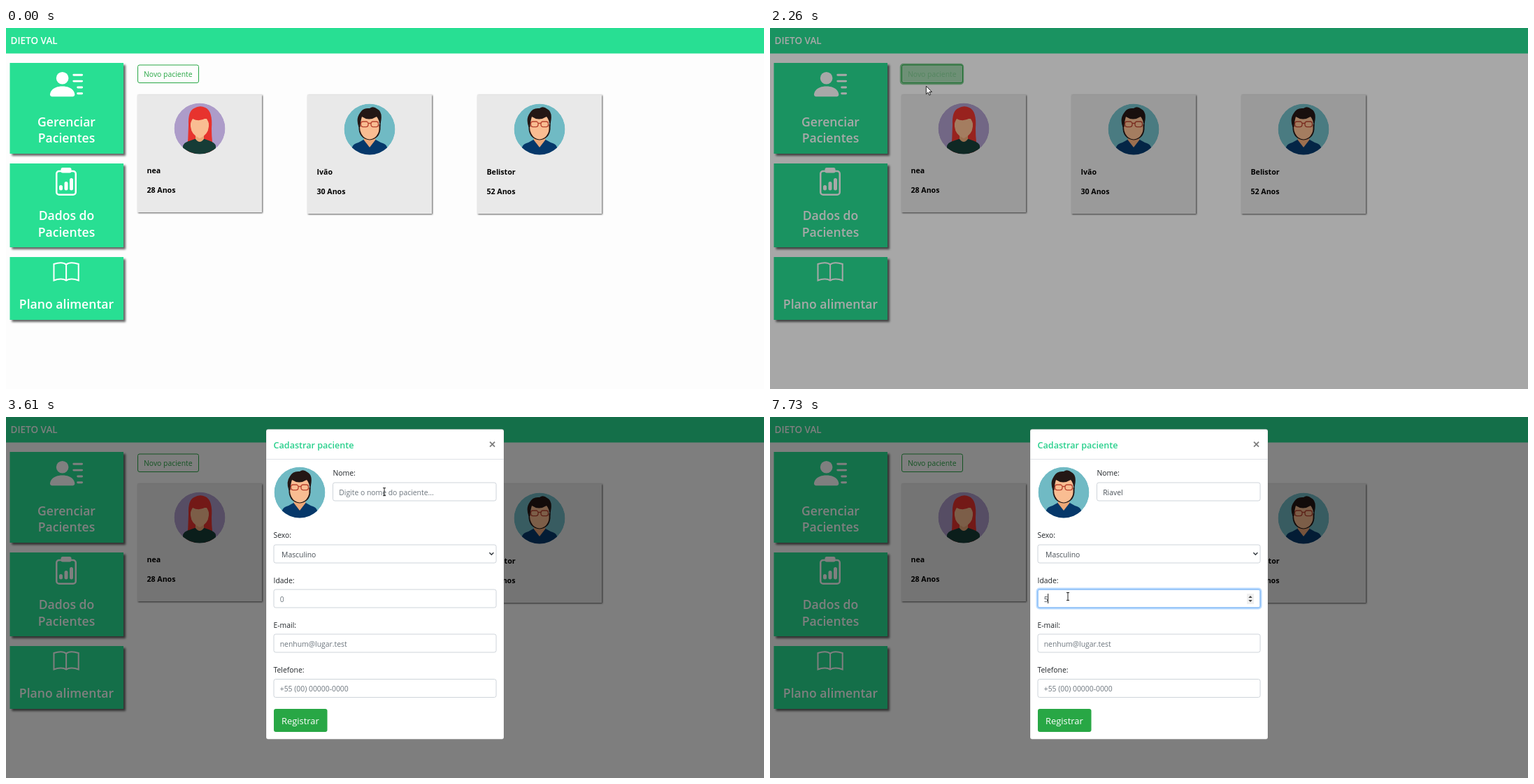
These frames come from a looping animation (1084x517 px, 8 s). An HTML page:

```html
<!DOCTYPE html>
<html lang="pt">
<head>
<meta charset="utf-8">
<title>Pacientes</title>
<style>
  html, body { margin: 0; width: 100%; height: 100%; overflow: hidden; background: #fdfdfd; }
  svg { display: block; width: 100%; height: 100%; }
  text { font: 10.4px "Open Sans", "Noto Sans", sans-serif; white-space: pre; }
  .brand { font-size: 13.5px; font-weight: 600; fill: #fff; }
  .tile { font-size: 17.6px; font-weight: 600; fill: #fff; text-anchor: middle; }
  .bold { font-size: 10.6px; font-weight: 700; }
  .title { font-size: 12.6px; font-weight: 600; fill: #28d08c; }
  .submit { font-size: 12.9px; font-weight: 500; fill: #fff; }
  .label { fill: #212529; }
  .hint { fill: #6c757d; }
  .value { fill: #495057; }
  .tileBox { fill: #28df93; filter: drop-shadow(3px 3px 1.6px rgba(0,0,0,.6)); }
  .card { fill: #e9e9e9; filter: drop-shadow(1.7px 1.7px 1px rgba(0,0,0,.65)); }
  .field { fill: #fff; stroke: #ced4da; }
  .line { fill: none; stroke: #fff; stroke-linecap: round; }
  .cursor { fill: #fff; stroke: #111; stroke-width: .9; stroke-linejoin: round; }
</style>
</head>
<body>
<svg id="stage" viewBox="0 0 1084 517">
  <defs>
    <clipPath id="disc"><circle r="36.5"/></clipPath>
    <g id="man" clip-path="url(#disc)">
      <circle r="36.5" fill="#70bac4"/>
      <path d="M-25 40V26Q-24 21-16 19L-7 14H7L16 19Q24 21 25 26V40Z" fill="#06386a"/>
      <path d="M-7 7H7L8.5 15 0 26-8.5 15Z" fill="#eda878"/>
      <path d="M-15.5-7V0Q-14 14 0 15.5 14 14 15.5 0V-7Z" fill="#241715"/>
      <path d="M-14-19H13.5V-3Q14 2 12 6 8 14 0 14.5-8 14-12 6-14 2-14-3Z" fill="#f9bd92"/>
      <path d="M-15.5-3Q-20-15-14-23-10-31 0-30 5-34 11-29 19-25 16-10L15-3Q14-14 10-18-1-11-11-18-13-12-13.5-3Z" fill="#241715"/>
      <g fill="none" stroke="#b8432f" stroke-width="1.3">
        <rect x="-12.5" y="-11" width="10.5" height="7.6" rx="3"/>
        <rect x="2" y="-11" width="10.5" height="7.6" rx="3"/>
        <path d="M-2-8.5H2"/>
      </g>
    </g>
    <g id="woman" clip-path="url(#disc)">
      <circle r="36.5" fill="#ad9cc9"/>
      <path d="M-8-29Q-17-25-16-5-16 15-19 36H21Q17 20 17 0 19-25 8-30 0-34-8-29Z" fill="#e7332e"/>
      <path d="M-24 40V25Q-23 20-14 17.5L-7 15H7L14 17.5Q22 20 23 25V40Z" fill="#163c36"/>
      <path d="M-6 8H6V15Q0 23-6 15Z" fill="#e9a877"/>
      <path d="M-13-14H13V-3Q12 9 0 14-12 9-13-3Z" fill="#f9bd92"/>
      <path d="M-14-2Q-17-20-8-27 2-33 12-25 17-18 14-2 13-11 9-15-1-9-10-14-13-10-14-2Z" fill="#e7332e"/>
    </g>
  </defs>

  <g id="page"></g>
  <rect id="backdrop" width="1084" height="517"/>
  <g id="modal"></g>
  <path id="arrow" class="cursor" d="M0 0V11.5L2.7 9 4.5 13 6.3 12.2 4.6 8.3H8.2Z"/>
  <path id="hand" class="cursor" d="M-1.3 9V1Q0-1 1.3 1V5.5Q2.6 4.6 3.6 6 4.9 5.3 5.7 6.6 7 6.2 7 8V11Q7 13.5 5.5 16H-.6Q-1.5 13.5-4.6 9.6-4.6 7.6-1.3 9.6Z"/>
  <path id="beam" d="M-2-5.5H2M0-5.5V5.5M-2 5.5H2" fill="none" stroke="#222"/>
</svg>
<script>
const $ = id => document.getElementById(id);
const label = (cls, x, y, s) => `<text class="${cls}" x="${x}" y="${y}">${s}</text>`;
const rect = (x, y, w, h, attrs) => `<rect x="${x}" y="${y}" width="${w}" height="${h}" ${attrs}/>`;

const tile = (y, h) => rect(5.5, y, 162.5, h, 'class="tileBox"');

function card(x, h, avatar, name, age) {
  const dy = h - 168.5;
  return rect(x, 95.5, 178, h, 'class="card"')
    + `<use href="#${avatar}" x="${x + 89}" y="${144 + dy / 2}"/>`
    + label('bold', x + 13.5, 208 + dy, name)
    + label('bold', x + 13.5, 235.5 + dy, age + ' Anos');
}

$('page').innerHTML = `
  <rect width="1084" height="517" fill="#fdfdfd"/>
  <rect width="1084" height="36.5" fill="#28df93"/>
  ${label('brand', 6.5, 22.5, 'DIETO VAL')}
  ${tile(50, 130)}${tile(194, 120)}${tile(328, 90)}
  <g transform="translate(63 57) scale(2.94)" fill="#fff">
    <circle cx="6" cy="5" r="3"/>
    <path d="M1 14s-1 0-1-1 1-4 6-4 6 3 6 4-1 1-1 1z"/>
    <path class="line" d="M11.5 3.5h4m-4 3h4m-2 3h2m-2 3h2"/>
  </g>
  <g transform="translate(66 200) scale(2.5)">
    <rect class="line" x="2.5" y="2" width="11" height="13.5" rx="1.5"/>
    <rect x="5" width="6" height="3" rx="1" fill="#fff"/>
    <path class="line" stroke-width="2" d="M5 11v1M8 9v3M11 7v5"/>
  </g>
  <path class="line" stroke-width=".85" transform="translate(67.3 331) scale(2.35)"
    d="M8 3.3C6.5 2 3.5 2 .5 3V13C3.5 11.8 6.5 12 8 13 9.5 12 12.5 11.8 15.5 13V3C12.5 2 9.5 2 8 3.3V13"/>
  ${label('tile', 86.5, 140.5, 'Gerenciar')}${label('tile', 86.5, 164, 'Pacientes')}
  ${label('tile', 86.5, 275, 'Dados do')}${label('tile', 86.5, 298.5, 'Pacientes')}
  ${label('tile', 86.5, 401.5, 'Plano alimentar')}
  ${rect(187, 52, 89, 28, 'id="buttonRing" rx="3.5" fill="none" stroke="#28a745" stroke-opacity=".55" stroke-width="2.4"')}
  ${rect(188.5, 53, 87, 25.5, 'rx="2.5" fill="#fdfdfd" stroke="#28a745"')}
  <text x="197" y="70" fill="#28a745">Novo paciente</text>
  <g id="buttonHover">
    ${rect(188, 52.5, 88, 26.5, 'rx="2.7" fill="#28a745"')}
    <text x="197" y="70" fill="#fff">Novo paciente</text>
  </g>
  ${card(188, 168.5, 'woman', 'nea', 28)}
  ${card(431, 170.5, 'man', 'Ivão', 30)}
  ${card(674, 170.5, 'man', 'Belistor', 52)}`;

// An input box with an optional focus state, hint, typed value and caret.
function field(id, x, y, hint) {
  const w = 701 - x, textX = x + 8.7;
  return rect(x, y, w, 26, 'rx="2.7" class="field"')
    + `<g id="${id}Focus" fill="none">`
    + rect(x - 1, y - 1, w + 2, 28, 'rx="3.6" stroke="#007bff" stroke-opacity=".27" stroke-width="3"')
    + rect(x, y, w, 26, 'rx="2.7" stroke="#80bdff"') + '</g>'
    + `<text id="${id}Hint" class="hint" x="${textX}" y="${y + 17.5}">${hint}</text>`
    + `<text id="${id}Value" class="value" x="${textX}" y="${y + 17.5}"></text>`
    + `<rect id="${id}Caret" x="${textX - .5}" y="${y + 6}" width="1" height="14" fill="#222"/>`;
}

$('modal').innerHTML = `
  ${rect(372, 17.5, 340, 444, 'rx="3" fill="#fff" stroke="#000" stroke-opacity=".2" stroke-width=".7"')}
  <path d="M372 60.5H712" stroke="#dee2e6"/>
  ${label('title', 382.5, 44.5, 'Cadastrar paciente')}
  <path d="M692 35.7l7 7m0-7l-7 7" stroke="#7f7f7f" stroke-width="1.9"/>
  <use href="#man" x="420" y="108"/>
  ${label('label', 467.5, 84, 'Nome:')}${field('name', 467.5, 94, 'Digite o nome do paciente...')}
  ${label('label', 382.5, 173, 'Sexo:')}
  ${rect(383, 183, 318, 26, 'rx="2.7" class="field"')}
  ${label('value', 394, 200.5, 'Masculino')}
  <path d="M691.3 194.3l3 3 3-3" fill="none" stroke="#343a40" stroke-width="1.5"/>
  ${label('label', 382.5, 237.5, 'Idade:')}${field('age', 383, 247, '0')}
  <g id="spinner">
    ${rect(682, 253, 10, 15, 'fill="#efefef"')}
    <path d="M684.3 259l2.7-3 2.7 3zM684.3 262l2.7 3 2.7-3z" fill="#444"/>
  </g>
  ${label('label', 382.5, 302, 'E-mail:')}${field('mail', 383, 311, 'nenhum@lugar.test')}
  ${label('label', 382.5, 366, 'Telefone:')}${field('phone', 383, 375.5, '+55 (00) 00000-0000')}
  ${rect(383, 418, 76.5, 33, 'rx="3" fill="#28a745"')}
  ${label('submit', 394, 440, 'Registrar')}`;

// Pointer path: time, x, y
const path = [
  [200, 1047, 505], [970, 111, 95], [1110, 107, 87], [1439, 107, 87], [1440, 118, 95],
  [1900, 216, 73], [2130, 221, 70], [2190, 221, 70], [2400, 230, 121], [2610, 404, 179],
  [3030, 560, 295], [3600, 541, 107], [3820, 540, 109], [5930, 540, 109],
  [6500, 424, 259], [6720, 426, 257], [8000, 426, 257]
];
const nameKeys = [4620, 4890, 5090, 5290, 5360, 5430];
const ramp = (t, start, length) => Math.min(1, Math.max(0, (t - start) / length));
const within = (v, a, b) => v >= a && v < b;

function pointerAt(t) {
  const i = Math.max(1, path.findIndex(k => k[0] > t));
  const [t0, x0, y0] = path[i - 1], [t1, x1, y1] = path[i];
  const u = ramp(t, t0, t1 - t0), e = u * u * (3 - 2 * u);
  return [x0 + (x1 - x0) * e, y0 + (y1 - y0) * e];
}

function pointerKind(t, x, y) {
  if (t < 200) return '';
  if (t < 2160) {
    const onTile = x < 168 && (within(y, 50, 180) || within(y, 194, 314) || within(y, 328, 418));
    const onButton = within(x, 188, 276) && within(y, 52, 79);
    return onTile || onButton ? 'hand' : 'arrow';
  }
  const onName = within(x, 467, 702) && within(y, 94, 120);
  const onOther = within(x, 383, 702) && [247, 311, 375].some(top => within(y, top, top + 26));
  return t > 2600 && (onName || onOther) ? 'beam' : 'arrow';
}

function setField(id, value, focus, caret) {
  $(id + 'Focus').style.opacity = focus;
  $(id + 'Hint').style.display = value ? 'none' : '';
  const text = $(id + 'Value');
  if (text.textContent !== value) text.textContent = value;
  $(id + 'Caret').style.opacity = caret ? 1 : 0;
  $(id + 'Caret').style.transform = `translateX(${value ? text.getComputedTextLength() : 0}px)`;
}

function draw() {
  const now = performance.now() % 8000;
  // The screen refreshes every 70 ms.
  const base = now < 1440 ? 200 : 2190;
  const t = Math.max(now < 1440 ? 0 : 1440, base + Math.floor((now - base) / 70) * 70);

  $('buttonHover').style.opacity = ramp(t, 1730, 150) - ramp(t, 2170, 150);
  $('buttonRing').style.opacity = ramp(t, 2030, 150) - ramp(t, 2630, 150);
  $('backdrop').style.opacity = ramp(t, 2158, 150) / 2;
  $('modal').style.opacity = ramp(t, 2315, 150);
  const lift = -34 * (1 - ramp(t, 2315, 300)) ** 1.6;
  $('modal').setAttribute('transform', `translate(0 ${lift})`);

  const typed = 'Riavel'.slice(0, nameKeys.filter(k => now >= k).length);
  setField('name', typed, ramp(t, 3640, 150) - ramp(t, 6500, 150),
    within(now, 3720, 4220) || within(now, 4620, 5960));
  setField('age', now >= 7730 ? '5' : '', ramp(t, 6500, 150),
    within(now, 6570, 7070) || now >= 7660);
  setField('mail', '', 0, false);
  setField('phone', '', 0, false);

  const [x, y] = pointerAt(t), kind = pointerKind(t, x, y);
  for (const id of ['arrow', 'hand', 'beam']) {
    $(id).style.display = id === kind ? '' : 'none';
    $(id).setAttribute('transform', `translate(${x} ${y})`);
  }
  $('spinner').style.display = t > 6000 && y > 247 ? '' : 'none';
  requestAnimationFrame(draw);
}
draw();
</script>
</body>
</html>
```
